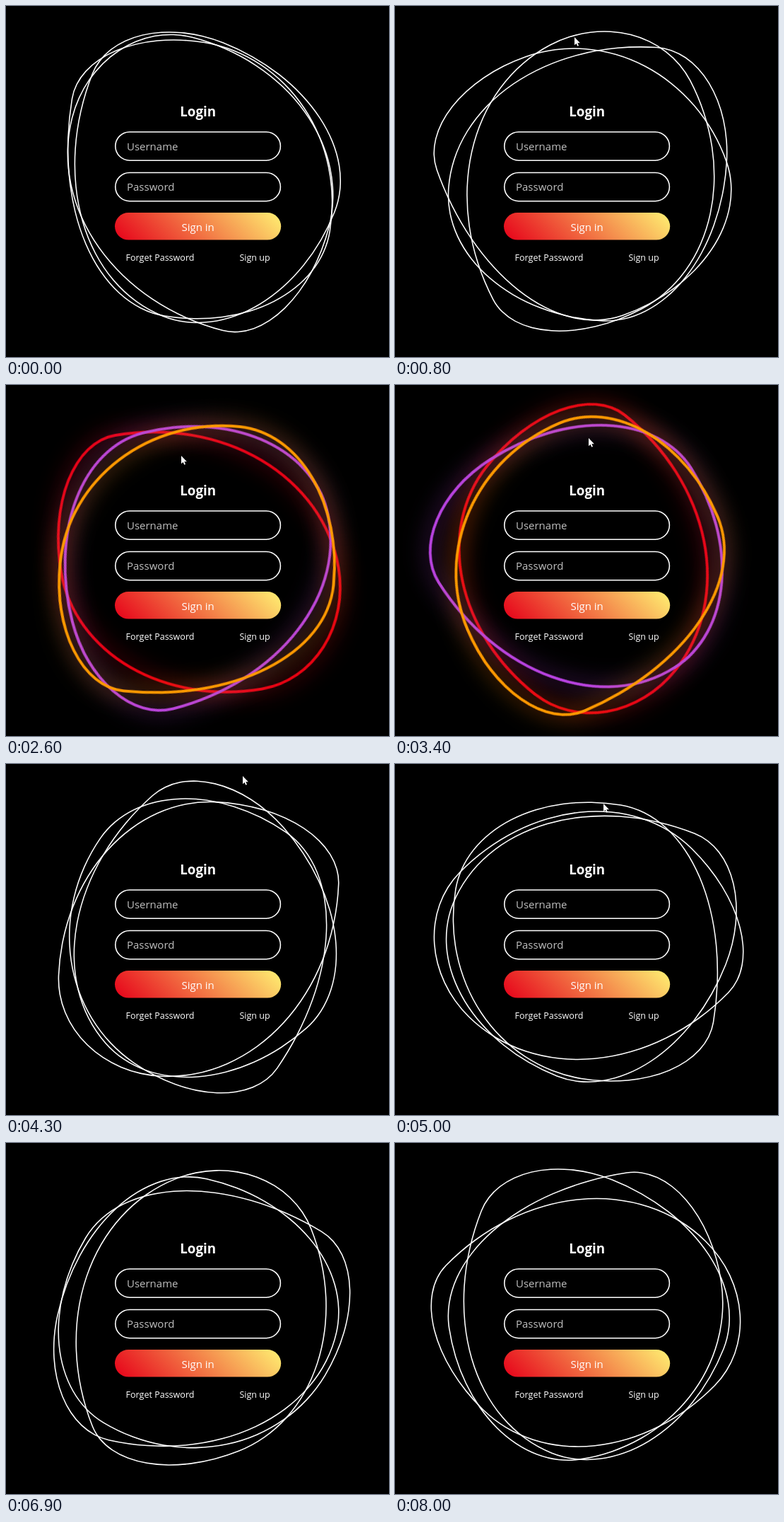
These frames come from a looping animation (542 by 496 pixels, 8100 ms). An HTML page:

```html
<!DOCTYPE html>
<html lang="en">
<head>
<meta charset="utf-8">
<title>Login</title>
<style>
  html, body { margin: 0; width: 100%; height: 100%; overflow: hidden; background: #000; }
  #stage { position: relative; width: 542px; height: 496px; overflow: hidden; background: #000; }
  #ring {
    position: absolute; left: 21.5px; top: -2px; width: 500px; height: 500px;
    transform: scale(.784);
  }
  #ring i { position: absolute; inset: 0; box-sizing: border-box; border: 2px solid #fff; }
  svg { position: absolute; left: 0; top: 0; }
  text { font-family: "Open Sans", "Noto Sans", sans-serif; font-size: 15px; fill: #fff; }
  .title { font-size: 18.8px; font-weight: 700; }
  .hint { fill: #bfbfbf; }
  .link { font-size: 12.53px; }
  .field { fill: none; stroke: #fff; stroke-width: 1.57; }
</style>
</head>
<body>
<div id="stage">
  <div id="ring"></div>
  <svg width="542" height="496" viewBox="0 0 542 496">
    <defs>
      <linearGradient id="fill" gradientUnits="userSpaceOnUse" x1="203.1" y1="379.7" x2="339.9" y2="242.9">
        <stop offset="0" stop-color="#e60019"/>
        <stop offset="1" stop-color="#fff172"/>
      </linearGradient>
    </defs>
    <text class="title" x="271.7" y="156" text-anchor="middle">Login</text>
    <rect class="field" x="154.8" y="178" width="233.6" height="40.2" rx="20.1"/>
    <text class="hint" x="171" y="204">Username</text>
    <rect class="field" x="154.8" y="235.5" width="233.6" height="40.2" rx="20.1"/>
    <text class="hint" x="171" y="261">Password</text>
    <rect x="154" y="292" width="235.2" height="38.6" rx="19.3" fill="url(#fill)"/>
    <text x="271.6" y="317.5" text-anchor="middle">Sign in</text>
    <text class="link" x="169.6" y="360">Forget Password</text>
    <text class="link" x="373.6" y="360" text-anchor="end">Sign up</text>
    <path id="cursor" fill="#fff" d="M0 0V11.2L2.6 8.9L4.3 12.8L6 12L4.3 8.2H7.9Z"/>
  </svg>
</div>
<script>
  const LOOP = 8100, STEP = 100, FADE = 0.5;

  // speed and start are in degrees per second and degrees
  const rings = [
    { color: [232, 0, 18], radius: '28% 72% 35% 65% / 46% 61% 39% 54%', speed: 60, start: -165.6 },
    { color: [184, 66, 224], radius: '40% 60% 44% 56% / 28% 42% 58% 72%', speed: 90, start: 21.6 },
    { color: [255, 153, 0], radius: '44% 56% 54% 46% / 28% 60% 40% 72%', speed: -36, start: 9.4 }
  ];
  const hovers = [[0.85, 3.5], [5, 6.25]];

  // seconds, x, y
  const route = [
    [0.5, 266, -16], [0.85, 252, 54], [1.1, 243, 99], [1.8, 243, 99], [2.2, 248, 100],
    [3.3, 248, 100], [3.5, 300, 50], [3.6, 325, 28], [3.7, 335, 17], [4.7, 335, 17],
    [5, 295, 56], [5.3, 265, 104], [6.1, 265, 104], [6.3, 280, 34], [6.5, 292, -16]
  ];

  const ring = document.getElementById('ring');
  const cursor = document.getElementById('cursor');
  for (const r of rings) {
    r.el = ring.appendChild(document.createElement('i'));
    r.el.style.borderRadius = r.radius;
  }

  const clamp = v => Math.min(1, Math.max(0, v));
  const mix = (a, b, k) => a + (b - a) * k;
  const bezier = (a, b, s) => 3 * a * s * (1 - s) ** 2 + 3 * b * s * s * (1 - s) + s ** 3;

  // The CSS "ease" curve, solved by bisection
  function ease(x) {
    if (x <= 0 || x >= 1) return clamp(x);
    let lo = 0, hi = 1;
    for (let n = 0; n < 20; n++) {
      const mid = (lo + hi) / 2;
      if (bezier(0.25, 0.25, mid) < x) lo = mid; else hi = mid;
    }
    return bezier(0.1, 1, lo);
  }

  const glowAt = t => hovers.reduce(
    (sum, [enter, leave]) => sum + ease((t - enter) / FADE) - ease((t - leave) / FADE), 0);

  function cursorAt(t) {
    const next = route.findIndex(p => p[0] > t);
    if (next < 1) return [0, -50];
    const a = route[next - 1], b = route[next];
    const k = (t - a[0]) / (b[0] - a[0]);
    return [mix(a[1], b[1], k), mix(a[2], b[2], k)];
  }

  function draw(t) {
    const k = glowAt(t);
    for (const { el, color, speed, start } of rings) {
      const rgb = color.map(c => Math.round(mix(255, c, k)));
      el.style.transform = `rotate(${start + speed * t}deg)`;
      el.style.borderWidth = mix(2, 5, k) + 'px';
      el.style.borderColor = `rgb(${rgb})`;
      el.style.filter = k > 0.001 ? `drop-shadow(0 0 ${20 * k}px rgba(${color},${k}))` : 'none';
    }
    cursor.setAttribute('transform', `translate(${cursorAt(t)})`);
  }

  const begin = performance.now();
  function tick() {
    const ms = (performance.now() - begin) % LOOP;
    draw(Math.floor(ms / STEP) * STEP / 1000);
    requestAnimationFrame(tick);
  }
  tick();
</script>
</body>
</html>
```
